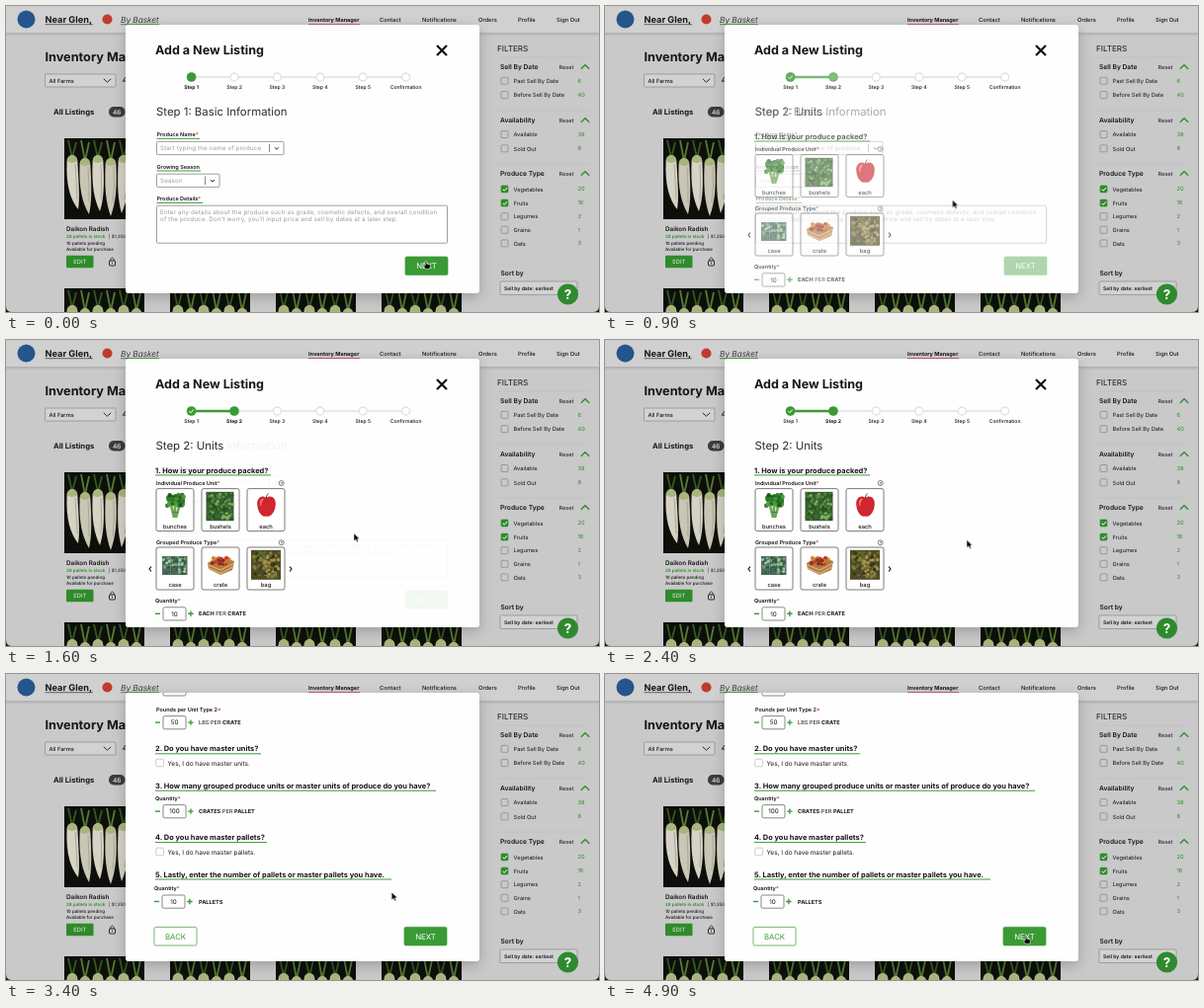
Animation of 600 by 310 pixels, one loop 5000 ms. Source, as an HTML page:

```html
<!DOCTYPE html>
<html lang="en">
<head>
<meta charset="utf-8">
<title>Add a New Listing</title>
<style>
html, body { margin: 0; width: 100%; height: 100%; overflow: hidden; background: #c9c9c9; }
svg { display: block; width: 600px; height: 310px; }
text { font-family: Inter, "Open Sans", sans-serif; text-rendering: geometricPrecision; white-space: pre; }
#scroll, #stepOne, #stepTwo, #cursor, #hand, #arrow { animation: 5s -5ms infinite; }
#scroll { animation-name: scroll; }
#stepOne { animation-name: leave; }
#stepTwo { animation-name: enter; }
#cursor { animation-name: move; }
#hand { animation-name: hand; animation-timing-function: step-end; }
#arrow { animation-name: arrow; animation-timing-function: step-end; }

@keyframes scroll {
  0%, 48% { transform: translateY(0); animation-timing-function: steps(2); }
  52% { transform: translateY(-90px); animation-timing-function: steps(2); }
  56% { transform: translateY(-190px); animation-timing-function: steps(2); }
  60% { transform: translateY(-242px); animation-timing-function: steps(2); }
  64%, 100% { transform: translateY(-262px); }
}
@keyframes leave {
  0%, 12% { opacity: 1; animation-timing-function: steps(3); }
  18% { opacity: .4; animation-timing-function: steps(3); }
  24% { opacity: .08; animation-timing-function: steps(5); }
  34% { opacity: .05; animation-timing-function: step-end; }
  36%, 100% { opacity: 0; }
}
@keyframes enter {
  0%, 12% { opacity: 0; animation-timing-function: steps(3); }
  18% { opacity: .63; animation-timing-function: steps(3); }
  24%, 100% { opacity: 1; }
}
@keyframes move {
  0%, 6% { transform: translate(425px, 258px); animation-timing-function: steps(5); }
  16% { transform: translate(351.5px, 196.5px); animation-timing-function: steps(10); }
  36% { transform: translate(352px, 195.5px); animation-timing-function: steps(4); }
  44%, 64% { transform: translate(366px, 202.5px); animation-timing-function: steps(6); }
  76%, 84% { transform: translate(438.5px, 258px); animation-timing-function: steps(3); }
  90%, 100% { transform: translate(426px, 265px); }
}
@keyframes hand { 0% { opacity: 1; } 8% { opacity: 0; } 88%, 100% { opacity: 1; } }
@keyframes arrow { 0% { opacity: 0; } 8% { opacity: 1; } 88%, 100% { opacity: 0; } }
</style>
</head>
<body>
<svg viewBox="0 0 600 310" xmlns="http://www.w3.org/2000/svg">
  <defs>
    <clipPath id="panel"><rect x="121" y="19" width="358" height="272" rx="3"/></clipPath>
    <linearGradient id="shade" x2="0" y2="1">
      <stop stop-color="#000" stop-opacity=".13"/><stop offset="1" stop-color="#000" stop-opacity="0"/>
    </linearGradient>
    <filter id="blur" x="-20%" y="-20%" width="140%" height="140%"><feGaussianBlur stdDeviation="7"/></filter>
  </defs>
  <g id="page"></g>
  <rect x="121" y="23" width="358" height="272" rx="3" fill-opacity=".22" filter="url(#blur)"/>
  <g clip-path="url(#panel)">
    <rect x="121" y="19" width="358" height="272" fill="#fefefe"/>
    <g id="scroll">
      <g id="shared"></g>
      <g id="stepOne"></g>
      <g id="stepTwo"></g>
    </g>
  </g>
  <g id="help"></g>
  <g id="cursor">
    <path id="arrow" d="M0 0V8L1.9 6.4L3.2 9L4.6 8.3L3.4 5.8H6Z" fill="#000" stroke="#fff" stroke-width=".6"/>
    <path id="hand" d="M-.8 .6Q0-.4 .8 .6V3.2L3.8 4Q4.6 4.3 4.4 5.4L3.8 8.4H-.4L-2.8 5.2Q-2.4 4-.8 5.2Z" fill="#000" stroke="#fff" stroke-width=".6"/>
  </g>
</svg>
<script>
const GREEN = '#3a9b35', DIM = '#2e8c29', INK = '#161616';
const put = (id, parts) => { document.getElementById(id).innerHTML = parts.flat(9).join(''); };

const text = (s, x, y, size, weight = 400, fill = INK, extra = '') =>
  `<text x="${x}" y="${y}" font-size="${size}" font-weight="${weight}" fill="${fill}" ${extra}>${s}</text>`;
const mid = (s, x, y, size, weight, fill) => text(s, x, y, size, weight, fill, 'text-anchor="middle"');
const rect = (x, y, w, h, fill, stroke = 'none', r = 0, sw = .7) =>
  `<rect x="${x}" y="${y}" width="${w}" height="${h}" rx="${r}" fill="${fill}" stroke="${stroke}" stroke-width="${sw}"/>`;
const line = (d, stroke = INK, sw = 1, extra = '') =>
  `<path d="${d}" fill="none" stroke="${stroke}" stroke-width="${sw}" ${extra}/>`;
const shape = (d, fill) => `<path d="${d}" fill="${fill}"/>`;
const dot = (x, y, r, fill, stroke = 'none', sw = 1) =>
  `<circle cx="${x}" cy="${y}" r="${r}" fill="${fill}" stroke="${stroke}" stroke-width="${sw}"/>`;
const times = (n, f) => Array.from({ length: n }, (_, i) => f(i));

let seed = 7;
const rand = () => (seed = seed * 16807 % 2147483647) / 2147483647;
const speckle = (x, y, w, h, n, r, colors) => times(n, i =>
  dot((x + r + rand() * (w - 2 * r)).toFixed(1), (y + r + rand() * (h - 2 * r)).toFixed(1), r, colors[i % colors.length]));

// Page behind the dialog
function radishes(x, y) {
  const roots = times(6, i => {
    const c = x + 8 + i * 13, t = y + 20 + (i % 2) * 3, b = y + 72 + (i * 5 % 8), lean = 6 - i * 2;
    return [
      line(`M${c} ${t}L${c - 4} ${y + 2}M${c} ${t}L${c + 4} ${y + 4}`, i % 2 ? '#557a33' : '#35581f', 1.8),
      shape(`M${c - 5.4} ${t + 4}C${c - 5.5} ${t - 5} ${c + 5.5} ${t - 5} ${c + 5.4} ${t + 4}C${c + 6.6} ${t + 27} ${c + 5 + lean / 2} ${t + 42} ${c + lean} ${b}C${c - 5 + lean / 2} ${t + 42} ${c - 6.4} ${t + 27} ${c - 5.4} ${t + 4}`, i % 2 ? '#c9c6b6' : '#d6d3c6'),
      shape(`M${c - 5.2} ${t + 3}C${c - 5} ${t - 5} ${c + 5} ${t - 5} ${c + 5.2} ${t + 3}Q${c} ${t + 7} ${c - 5.2} ${t + 3}`, '#a9b57c'),
      line(`M${c + 3} ${t + 6}Q${c + 4.4} ${t + 26} ${c + 2 + lean / 2} ${t + 42}`, '#a19d8a', .8)
    ];
  });
  return [rect(x, y, 81, 82, '#0d0f0b'), roots];
}

function filter(y, label, count, on) {
  return [
    rect(501, y - 3.7, 7, 7, on ? DIM : 'none', on ? DIM : '#777', 1, .6),
    on ? line(`M502.6 ${y}l1.6 1.6l2.8-3.2`, '#fff', 1) : '',
    text(label, 513.5, y + 2, 5.7),
    text(count, 578.5, y + 1.5, 5.7, 400, DIM)
  ];
}
const section = (y, label) => [
  line(`M497 ${y - 12}H590`, '#bcbcbc', .6),
  text(label, 500, y, 6.7, 600), text('Reset', 559.5, y, 5.6),
  line(`M581.8 ${y - .3}l4.2-4l4.2 4`, DIM, 1.3)
];

put('page', [
  rect(0, 0, 600, 310, '#c9c9c9'),
  rect(0, 0, 600, 27, '#d0d0d0'),
  rect(0, 27, 600, 4, 'url(#shade)'),
  dot(20.5, 13.5, 9, '#24558c'),
  text('Near Glen,', 39.5, 16.5, 9.2, 700),
  line('M39.5 18.7H88', '#333', .7),
  dot(102.5, 13.5, 5, '#bf3b2c'),
  text('By Basket', 116, 16.5, 8.3, 300, INK, 'font-style="italic"'),
  line('M116 18.7H155', DIM, .9),
  text('Inventory Manager', 306, 15.8, 5.55, 700),
  line('M306 18.8H358', '#c0304a', 1),
  [['Contact', 378], ['Notifications', 421], ['Orders', 478], ['Profile', 518], ['Sign Out', 557]]
    .map(([s, x]) => text(s, x, 15.8, 5.75, 500)),

  text('Inventory Manager', 39.5, 56, 12.7, 700),
  rect(39.5, 69, 71.5, 13, '#d2d2d2', '#888', 1),
  text('All Farms', 43.5, 77.6, 5.7, 500),
  line('M98.8 73.8l3.7 3.4l3.7-3.4', INK, .9),
  line('M121.5 71.5l-3.3 4.6h3.3', INK, .9),
  text('All Listings', 48, 110, 7.7, 700),
  rect(104, 102, 16.5, 10.5, '#3c3c3c', 'none', 5),
  mid('46', 112.3, 109.7, 6.6, 500, '#e8e8e8'),

  radishes(59, 134),
  times(4, i => radishes(59 + i * 107, 286)),
  text('Daikon Radish', 61, 228, 6.35, 600),
  text('28 pallets in stock', 61, 235.2, 4.5, 600, DIM),
  text('| $1,350', 104, 235.2, 4.5),
  text('10 pallets pending', 61, 241.6, 4.5, 500),
  text('Available for purchase', 61, 248, 4.5, 500),
  rect(61, 252.7, 27.5, 12.6, DIM, 'none', 1),
  mid('EDIT', 74.8, 261.2, 5.8, 500, '#d8d8d8'),
  rect(104.5, 258, 6, 5, 'none', INK, .6, .9),
  line('M105.8 258v-1.6q1.7-3 3.4 0v1.6M107.5 259.6v1.6', INK, .8),

  text('FILTERS', 497, 46, 8.1, 400),
  section(64, 'Sell By Date'),
  filter(76, 'Past Sell By Date', 6),
  filter(90.3, 'Before Sell By Date', 40),
  section(118, 'Availability'),
  filter(130.2, 'Available', 38),
  filter(144.5, 'Sold Out', 8),
  section(172, 'Produce Type'),
  filter(185.6, 'Vegetables', 20, true),
  filter(199.8, 'Fruits', 16, true),
  filter(213.4, 'Legumes', 2),
  filter(227, 'Grains', 1),
  filter(240.6, 'Oats', 3),
  text('Sort by', 500.5, 273, 6.7, 600),
  rect(500, 279, 78, 13.5, '#d2d2d2', '#888', 1),
  text('Sell by date: earliest', 504, 287.6, 5.1, 600),
  shape('M0 304Q0 310 6 310H0ZM600 304Q600 310 594 310H600Z', '#111')
]);

put('help', [
  dot(568.5, 292, 10.6, '#2f8a2f'),
  mid('?', 568.5, 296.8, 13.4, 700, '#fff')
]);

// Dialog
const stops = times(6, i => 187.6 + i * 43.4);
const star = '<tspan fill="#d33a2c">*</tspan>';
const label = (s, x, y, req) => text(s + (req ? star : ''), x, y, 5.5, 600);
const under = (x1, x2, y) => line(`M${x1} ${y}H${x2}`, GREEN, 1);
const hint = (s, y) => text(s, 156, y, 6.2, 400, '#9a9a9a', 'letter-spacing=".17"');
const stepName = (i, weight) => mid(`Step ${i + 1}`, stops[i], 84.3, 5.1, weight);
const select = (y, w, s) => [
  rect(152.5, y, w, 13.2, '#fff', '#777', 1),
  hint(s, y + 8.8),
  line(`M${138 + w} ${y + 2.4}v8.4`, '#555', .7),
  line(`M${143.4 + w} ${y + 5.9}l2 2l2-2`, '#222', 1)
];
const button = (x, y, s, solid) => [
  rect(x, y, 43, 18.6, solid ? GREEN : '#fff', GREEN, 1.5),
  mid(s, x + 21.5, y + 12.2, 7.8, 400, solid ? '#fff' : GREEN)
];

put('shared', [
  text('Add a New Listing', 151, 49.3, 12.55, 700),
  line('M436 40l10 10M446 40l-10 10', '#111', 2.2),
  line(`M${stops[0]} 72H${stops[5]}`, '#e8e8e8', 2),
  stops.map(x => dot(x, 72, 4, '#fff', '#e2e2e2', 1.4)),
  [2, 3, 4].map(i => stepName(i, 500)),
  mid('Confirmation', stops[5], 84.3, 5.1, 500)
]);

put('stepOne', [
  dot(stops[0], 72, 4.8, GREEN),
  stepName(0, 700), stepName(1, 500),
  text('Step 1: Basic Information', 152, 111, 11.4, 400, '#2c2c2c'),
  label('Produce Name', 152.5, 132, true), under(152.5, 196, 134.3),
  select(137.4, 128.5, 'Start typing the name of produce'),
  label('Growing Season', 152.5, 164.8), under(152.5, 197, 167),
  select(170.2, 63.5, 'Season'),
  label('Produce Details', 152.5, 197, true), under(152.5, 199, 199.4),
  rect(152.5, 202.2, 294, 38, '#fff', '#777', 1),
  hint('Enter any details about the produce such as grade, cosmetic defects, and overall condition', 211.3),
  hint('of the produce. Don’t worry, you’ll input price and sell by dates at a later step.', 218.4),
  button(404, 254, 'NEXT', true)
]);

const info = y => [dot(278.7, y, 2.5, 'none', '#333', .6), mid('?', 278.7, y + 1.5, 4, 500)];
const tile = (i, y, s) => [rect(152 + i * 46, y, 38, 43, '#fff', '#444', 2), mid(s, 171 + i * 46, y + 40.4, 5.8, 500)];
const question = (s, y, end) => [text(s, 151, y, 7.45, 700), under(151, end, y + 2.4)];
const tick = (y, s) => [rect(151.8, y, 7.6, 7.6, '#fff', '#aaa', 1, .6), text(s, 163.5, y + 6.4, 6.45)];
const unit = (a, b, w = 700) => `<tspan font-weight="${w}">${a}</tspan> PER <tspan font-weight="700">${b}</tspan>`;
const counter = (x, y, n, s) => [
  line(`M${x} ${y + 6.5}h5`, GREEN, 1.4),
  rect(x + 8, y, 23, 13.2, '#fff', '#555', 1.5),
  mid(n, x + 19.5, y + 8.8, 6.3, 400),
  line(`M${x + 33.2} ${y + 6.5}h5.4M${x + 35.9} ${y + 3.8}v5.4`, GREEN, 1.4),
  text(s, 195, y + 8.6, 5.6)
];

const greens = ['#4f8f3a', '#27521f', '#7fae5c', '#38702b'];
const bunch = [
  line('M170 180L166 163M171 180V162M172 180L177 163', '#6fa648', 2.6),
  line('M168.5 174.5h6', '#3f6fae', 1),
  speckle(161, 154, 21, 17, 46, 2.2, ['#2f7a2a', '#1f5a1f', '#4a9a3c'])
];
const bushel = [rect(202.5, 153.8, 28, 29.4, '#3a5a34'), speckle(202.5, 153.8, 28, 29.4, 90, 1.5, greens)];
const apple = [
  shape('M263.5 160C267 156.5 273 159 272.8 166C272.6 174 268 180 263.5 178.5C259 180 254.3 174 254.2 166C254 159 260 156.5 263.5 160', '#cf2630'),
  shape('M257 164q1-4 4-3q-3 3-2.6 8q-2-2-1.4-5', '#ee7a74'),
  line('M263.5 161Q263 157.5 265.5 155.5', '#5b3a1e', 1)
];
const box = [
  rect(158, 219, 25.5, 19, '#4d6a62'),
  speckle(158, 219, 25.5, 19, 60, 1.5, ['#79a86a', '#2c5a38', '#a9c7b4', '#35613a']),
  line('M166.5 219v19M175 219v19M158 228.5h25.5', '#8fa8a4', .5)
];
const crate = [
  shape('M204 226L215 219L231 224L229 233L217 238L205 232Z', '#b07a42'),
  speckle(207, 219, 21, 10, 24, 1.7, ['#c8352a', '#d98a2b', '#8e2a20']),
  line('M204 227.5L217 233L231 226M205 231L217 236.5L229.6 230', '#dcae74', 1.3)
];
const bag = [rect(248, 212.8, 30, 30, '#4e4a26'), speckle(248, 212.8, 30, 30, 90, 1.7, ['#8c7a3c', '#5d6a2c', '#33371a', '#a8924e'])];

put('stepTwo', [
  line(`M${stops[0]} 72H${stops[1]}`, GREEN, 2.4),
  dot(stops[0], 72, 4.8, GREEN), dot(stops[1], 72, 4.8, GREEN),
  line('M185.4 72l1.6 1.7l2.9-3.3', '#fff', 1),
  stepName(0, 500), stepName(1, 700),
  text('Step 2: Units', 151.5, 111, 11.4, 400, '#2c2c2c'),
  question('1. How is your produce packed?', 134.5, 268),
  label('Individual Produce Unit', 152, 147.2, true), info(145),
  ['bunches', 'bushels', 'each'].map((s, i) => tile(i, 150.6, s)),
  bunch, bushel, apple,
  label('Grouped Produce Type', 152, 206.6, true), info(205.2),
  ['case', 'crate', 'bag'].map((s, i) => tile(i, 210, s)),
  box, crate, bag,
  line('M147 229.6l-2 2.4l2 2.4M287 229.6l2 2.4l-2 2.4', '#111', 1.1),
  label('Quantity', 151, 266.4, true),
  counter(151, 270.8, 10, unit('EACH', 'CRATE')),
  label('Pounds per Unit Type 2', 152, 300, true),
  counter(151, 304.6, 50, unit('LBS', 'CRATE', 400)),
  question('2. Do you have master units?', 340.4, 258),
  tick(348.2, 'Yes, I do have master units.'),
  question('3. How many grouped produce units or master units of produce do you have?', 377.8, 435),
  label('Quantity', 151, 390, true),
  counter(151, 394.6, 100, unit('CRATES', 'PALLET')),
  question('4. Do you have master pallets?', 430.2, 264),
  tick(438.2, 'Yes, I do have master pallets.'),
  question('5. Lastly, enter the number of pallets or master pallets you have.', 467.6, 390),
  label('Quantity', 150, 481.4, true),
  counter(150, 486, 10, '<tspan font-weight="700">PALLETS</tspan>'),
  button(150, 518.4, 'BACK'),
  button(403, 518.4, 'NEXT', true)
]);
</script>
</body>
</html>
```
